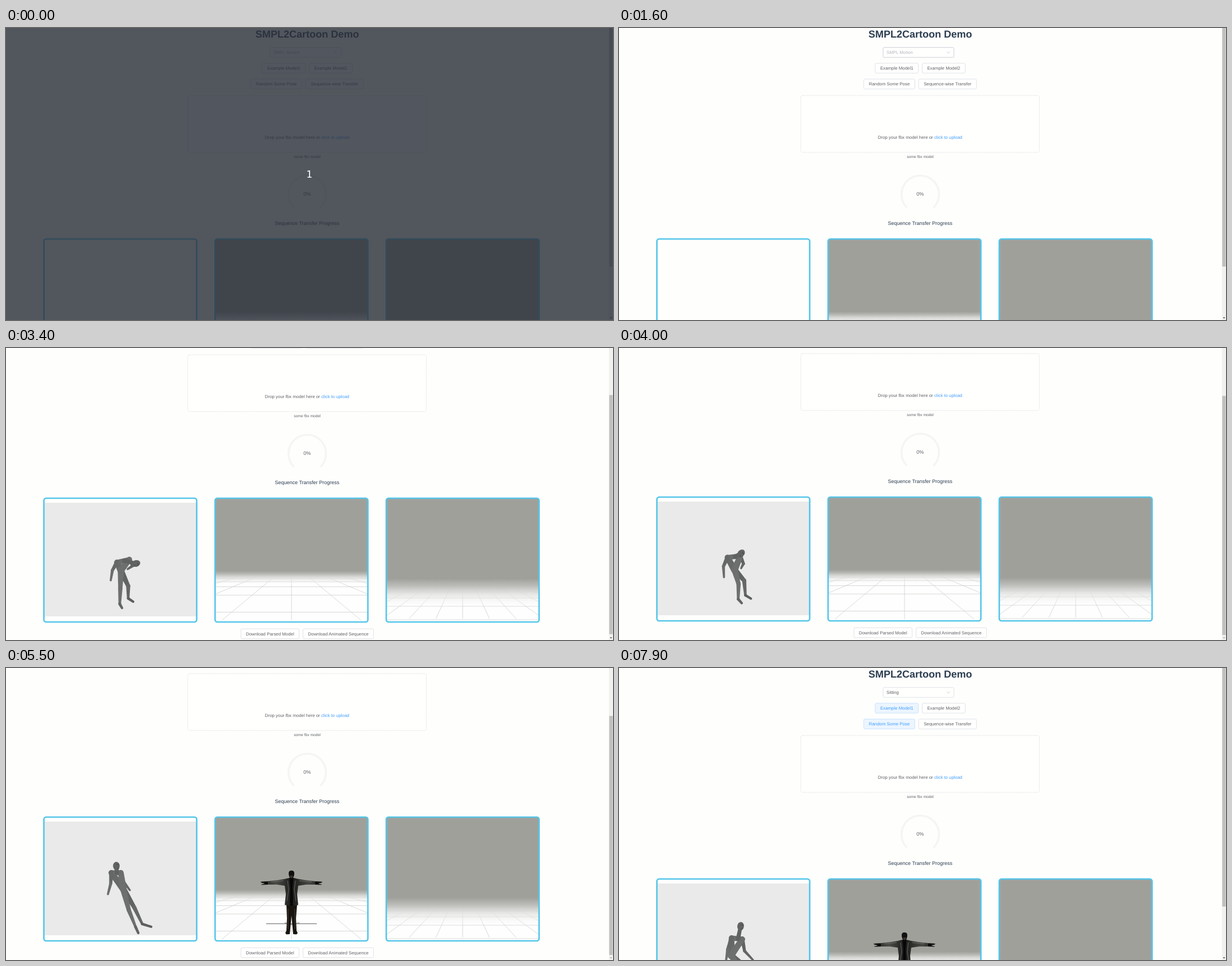
An HTML page for the animation above (8 s loop, 1078 by 519 pixels).

```html
<!DOCTYPE html>
<html lang="en">
<head>
<meta charset="utf-8">
<title>SMPL2Cartoon Demo</title>
<style>
  html, body { margin: 0; width: 100%; height: 100%; overflow: hidden; background: #fefefd; }
  svg { display: block; width: 1078px; height: 519px; }
  text { font: 7.875px "Liberation Sans", Arial, sans-serif; fill: #606266; text-rendering: geometricPrecision; }
  .mid { text-anchor: middle; }
  .title { font-size: 18px; font-weight: bold; fill: #2c3e50; }
  .big { font-size: 9px; }
  .small { font-size: 6.75px; }
  .link { fill: #409eff; }
  .box { fill: #fffffe; stroke: #d8dbe2; stroke-width: .8; }
  .on .box { fill: #ecf5ff; stroke: #bfdefd; }
  .on text { fill: #409eff; }
  .frame { fill: none; stroke: #54c6e9; stroke-width: 2.6; }
  .grid { fill: none; stroke: #c9c9c7; stroke-width: .7; }
  .count { font: 17.5px "DejaVu Sans", sans-serif; fill: #fff; }
</style>
</head>
<body>
<svg viewBox="0 0 1078 519">
  <defs>
    <linearGradient id="fogNear" x1="0" y1="504" x2="0" y2="529" gradientUnits="userSpaceOnUse">
      <stop offset="0" stop-color="#a0a09b"/>
      <stop offset=".2" stop-color="#b5b5b1"/>
      <stop offset=".42" stop-color="#d6d6d4"/>
      <stop offset="1" stop-color="#fefefe" stop-opacity="0"/>
    </linearGradient>
    <linearGradient id="fogFar" x1="0" y1="518" x2="0" y2="570" gradientUnits="userSpaceOnUse">
      <stop offset="0" stop-color="#a0a09b"/>
      <stop offset=".25" stop-color="#bcbcb9"/>
      <stop offset=".5" stop-color="#dededc" stop-opacity=".85"/>
      <stop offset="1" stop-color="#fefefe" stop-opacity="0"/>
    </linearGradient>
    <linearGradient id="coat" x1="0" y1="0" x2="1" y2="0">
      <stop offset="0" stop-color="#20201e"/>
      <stop offset=".25" stop-color="#4b4b47"/>
      <stop offset=".5" stop-color="#1b1b1a"/>
      <stop offset=".78" stop-color="#474743"/>
      <stop offset="1" stop-color="#1c1c1b"/>
    </linearGradient>
    <filter id="shade" x="-20%" y="-20%" width="140%" height="140%">
      <feDropShadow dx="0" dy="1.1" stdDeviation="3.3" flood-opacity=".12"/>
    </filter>
    <clipPath id="view"><rect x="68" y="383" width="270" height="202"/></clipPath>
    <clipPath id="c370"><rect x="371.5" y="375" width="271" height="220" rx="3"/></clipPath>
    <clipPath id="c674"><rect x="675.5" y="375" width="271" height="220" rx="3"/></clipPath>
  </defs>

  <g id="page">
    <text class="mid title" x="535" y="17.4">SMPL2Cartoon Demo</text>
    <rect id="select" class="box" x="469" y="34.6" width="125.8" height="17.6" rx="2"/>
    <text id="value" x="475" y="46.2"></text>
    <path id="chevron" d="M-2.6-1.3 0 1.3 2.6-1.3" fill="none" stroke="#b9bdc5" stroke-width=".8"/>
    <g id="buttons"></g>

    <rect id="zone" x="322.9" y="120" width="423.6" height="101" rx="3.4" fill="#fffffe" stroke="#dadada" stroke-width=".8" stroke-dasharray="1.8 1.2"/>
    <text class="mid" x="534.8" y="196.5">Drop your fbx model here or <tspan class="link">click to upload</tspan></text>
    <text class="mid small" x="535" y="231.4">some fbx model</text>
    <path d="M511.5 319.2A33.3 33.3 0 1 1 558.5 319.2" fill="none" stroke="#f5f5f4" stroke-width="3.6"/>
    <text class="mid big" x="534.8" y="298.3">0%</text>
    <text class="mid big" x="534.8" y="350" style="fill:#2c3e50">Sequence Transfer Progress</text>

    <g id="body" clip-path="url(#view)">
      <rect x="68" y="383" width="270" height="202" fill="#eaeaea"/>
    </g>
    <g id="floors"></g>
    <g id="model" transform="translate(507 470)">
      <path d="M-45 94.5H45M-12 93 0 96 14 93" stroke="#8d8d8a" stroke-width="1.4" fill="none"/>
      <path d="M-9 60-8 85-9 107-11 111-9 113.500-3 113 0 80 3 113 9 113.500 11 111 9 107 8 85 10 60Z" fill="#17140f"/>
      <path d="M-6 68-6 104M6 68 6 104" stroke="#332a1d" stroke-width="2" fill="none"/>
      <path d="M-4 13-12 15-24 17-42 19-55 20-53 22-46 23-55 25-44 25-26 25-12 27-10 42-12 61-4 63 0 50 4 63 12 61 10 42 12 27 26 25 44 25 55 25 46 23 53 22 55 20 42 19 24 17 12 15 4 13Z" fill="url(#coat)"/>
      <path d="M-55 20-42 19.500-42 25-54 25.500-47 23ZM55 20 42 19.500 42 25 54 25.500 47 23Z" fill="#0d0d0c"/>
      <path d="M-36 20-14 18M36 20 14 18M-7 18-5 34-8 54M7 18 5 34 8 54" stroke="#6a6a65" stroke-width="1.3" fill="none" opacity=".75"/>
      <path d="M-3.500 13-2 30-3 62H3L2 30 3.500 13Z" fill="#070707"/>
      <path d="M-5 5Q-5 0 0 0T5 5Q5 12 0 15.500Q-5 12-5 5Z" fill="#11100f"/>
      <path d="M-3 9H3L1.500 13H-1.500Z" fill="#3b342d"/>
    </g>
    <g id="frames"></g>
    <g id="menu" filter="url(#shade)">
      <path d="M485 59.300 488.500 55.800 492 59.300" fill="#fff"/>
      <rect x="469" y="59" width="132" height="275" rx="2.2" fill="#fff" stroke="#e4e7ed" stroke-width=".6"/>
      <rect id="hover" x="469.3" width="131.400" height="19.100" fill="#f5f7fa"/>
    </g>
  </g>

  <rect x="1070.7" width="7.300" height="519" fill="#f1f1f0"/>
  <rect id="thumb" x="1071.3" width="6.200" height="425" fill="#c0c0bf"/>
  <path id="arrow" d="M1072.300 514.200H1076.700L1074.500 516.600Z"/>
  <g id="cover">
    <rect width="1078" height="519" fill="#2a2f39" opacity=".81"/>
    <text class="mid count" x="538.8" y="266">1</text>
  </g>
</svg>
<script>
const LOOP = 8000, STEP = 100;
const $ = id => document.getElementById(id);

function add(parent, tag, attrs = {}, text = '') {
  const el = document.createElementNS('http://www.w3.org/2000/svg', tag);
  for (const k in attrs) el.setAttribute(k, attrs[k]);
  el.textContent = text;
  parent.append(el);
  return el;
}

function button(x, y, width, label) {
  const g = add($('buttons'), 'g');
  add(g, 'rect', { class: 'box', x, y, width, height: 17.5, rx: 2 });
  add(g, 'text', { class: 'mid', x: x + width / 2, y: y + 11.6 }, label);
  return g;
}
const model1 = button(454.9, 62.7, 76.7, 'Example Model1');
button(538.5, 62.7, 76.3, 'Example Model2');
const random = button(434.7, 90.8, 90.6, 'Random Some Pose');
button(532.2, 90.8, 102.6, 'Sequence-wise Transfer');
button(417.2, 607.2, 103.3, 'Download Parsed Model');
button(527.5, 607.2, 125.2, 'Download Animated Sequence');

// Perspective ground: rows at horizon + depth / (near + n), columns through the vanishing point.
function floor(x, horizon, fogTop, fog, slope, depth, near) {
  const g = add($('floors'), 'g', { 'clip-path': `url(#c${x})` });
  const cx = x + 137;
  let d = '';
  for (let n = 0; n < 14; n++) d += `M${x} ${horizon + depth / (near + n)}h274`;
  for (let n = -12; n <= 12; n++) d += `M${cx} ${horizon}L${cx + n * slope * 103} ${horizon + 103}`;
  add(g, 'rect', { x, y: 374, width: 274, height: 222, fill: '#fefefe' });
  add(g, 'path', { d, class: 'grid' });
  add(g, 'rect', { x, y: fogTop, width: 274, height: 596 - fogTop, fill: `url(#${fog})` });
  add(g, 'rect', { x, y: 374, width: 274, height: fogTop - 373.8, fill: '#a0a09b' });
}
floor(370, 489, 504, 'fogNear', 1.2, 170, 1.92);
floor(674, 486, 518, 'fogFar', .4615, 357, 3.4);
for (const x of [66, 370, 674])
  add($('frames'), 'rect', { class: 'frame', x: x + 1.3, y: 375, width: 271.4, height: 220, rx: 4 });

const options = ['Walking', 'Running', 'Sitting', 'Jumping', 'Dancing', 'Kicking', 'Waving',
  'Punching', 'Crawling', 'Stretching', 'Throwing', 'Climbing', 'Turning', 'Standing'];
const rowY = i => 62.4 + i * 19.125;
options.forEach((name, i) => add($('menu'), 'text', { x: 480, y: rowY(i) + 12.3 }, name));

// Joints: head, shoulders A B, pelvis, elbow+hand A, elbow+hand B, knee+ankle+toe A, knee+ankle+toe B.
const bend = [231,491, 197,489, 219,484, 204,503, 189,503, 186,521, 225,495, 216,501,
  203,536, 202,563, 206,570, 217,531, 217,553, 226,559];
const sit = [199,455, 187,474, 211,474, 207,506, 181,492, 187,513, 216,491, 218,502,
  224,521, 224,548, 233,555, 229,514, 234,545, 245,551];
const lean = [196,462, 187,474, 204,474, 208,502, 186,493, 181,512, 209,490, 220,505,
  218,540, 230,570, 235,581, 228,536, 242,565, 258,570];
const slide = [193,463, 186,474, 202,473, 208,503, 186,492, 180,512, 207,488, 219,504,
  210,541, 220,572, 227,584, 220,538, 232,569, 244,576];
const crouch = [216,459, 200,480, 219,482, 199,511, 193,500, 190,521, 223,503, 238,519,
  212,530, 202,560, 212,566, 222,528, 215,556, 226,562];
const poses = [[2400, crouch], [3400, bend], [4700, sit], [5500, lean], [6700, slide], [7900, crouch]];

// from, to, radii, shade
const limbs = [
  [2, 6, 3.6, 2.6, '#5f6261'], [6, 7, 2.6, 1.7, '#636665'],
  [3, 11, 5.4, 3.6, '#606362'], [11, 12, 3.7, 2.2, '#656867'], [12, 13, 2.4, 2, '#5c5f5e'],
  [3, 8, 5.6, 3.7, '#6d706f'], [8, 9, 3.8, 2.3, '#6d706f'], [9, 10, 2.6, 2.2, '#626564'],
  [1, 3, 5, 6.2, '#666968'], [2, 3, 5, 6, '#6c6f6e'], [1, 2, 4.4, 4.4, '#6a6d6c'],
  [1, 4, 3.8, 2.7, '#646766'], [4, 5, 2.7, 1.8, '#6a6d6c']
].map(([a, b, ra, rb, fill]) => ({ a, b, ra, rb, el: add($('body'), 'path', { fill }) }));
const neck = add($('body'), 'path', { fill: '#5f6261' });
const head = add($('body'), 'ellipse', { rx: 5.9, ry: 7.6, fill: '#606362' });
const face = add($('body'), 'path', { d: 'M0-2.500H4.500M1 4H4', stroke: '#484b4a', 'stroke-width': 1.1, fill: 'none' });

function capsule([x1, y1], [x2, y2], r1, r2) {
  const a = Math.atan2(y2 - y1, x2 - x1), nx = -Math.sin(a), ny = Math.cos(a);
  return `M${x1 + nx * r1} ${y1 + ny * r1}A${r1} ${r1} 0 0 1 ${x1 - nx * r1} ${y1 - ny * r1}` +
    `L${x2 - nx * r2} ${y2 - ny * r2}A${r2} ${r2} 0 0 1 ${x2 + nx * r2} ${y2 + ny * r2}Z`;
}

function span(keys, t) {
  let i = 0;
  while (i < keys.length - 2 && t >= keys[i + 1][0]) i++;
  const [t0, a] = keys[i], [t1, b] = keys[i + 1];
  return { a, b, k: Math.min(1, Math.max(0, (t - t0) / (t1 - t0))) };
}
function tween(keys, t) {
  const { a, b, k } = span(keys, t);
  return a + (b - a) * k;
}

function drawBody(t) {
  const { a, b, k } = span(poses, t);
  const ease = k * k * (3 - 2 * k);
  const v = a.map((n, i) => n + (b[i] - n) * ease);
  const joint = i => [v[i * 2], v[i * 2 + 1]];
  for (const l of limbs) l.el.setAttribute('d', capsule(joint(l.a), joint(l.b), l.ra, l.rb));
  const [hx, hy] = joint(0), [ax, ay] = joint(1), [bx, by] = joint(2);
  const nx = ax * .4 + bx * .6, ny = ay * .4 + by * .6;
  neck.setAttribute('d', capsule([hx, hy], [nx, ny], 3.2, 3.8));
  const tilt = Math.atan2(hx - nx, ny - hy) * 180 / Math.PI * .7;
  const place = `translate(${hx} ${hy}) rotate(${tilt})`;
  head.setAttribute('transform', place);
  face.setAttribute('transform', place);
}

const scrollKeys = [[2900, 0], [3200, 80], [3400, 108], [3500, 110], [4100, 110], [4500, 0],
  [5000, 0], [5300, 85], [5500, 110], [6600, 110], [6700, 84], [7100, 0]];
const menuKeys = [[1600, 0], [1900, 1], [2400, 1], [2700, 0]];
const within = (t, from, to) => t >= from && t < to;
const show = (el, on) => el.setAttribute('display', on ? 'inline' : 'none');

function draw(t) {
  const scroll = tween(scrollKeys, t), open = tween(menuKeys, t);
  $('page').setAttribute('transform', `translate(0 ${-scroll})`);
  $('thumb').setAttribute('y', scroll * .783 - 1);
  $('arrow').setAttribute('fill', scroll >= 110 ? '#a3a3a3' : '#505050');
  show($('cover'), t < 100);

  $('zone').style.stroke = within(t, 500, 600) ? '#409eff' : '';
  model1.setAttribute('class', within(t, 600, 700) || t >= 4800 ? 'on' : '');
  random.setAttribute('class', t >= 7400 ? 'on' : '');
  $('select').style.stroke = within(t, 1700, 5000) ? '#409eff' : within(t, 900, 1700) ? '#c0c4cc' : '';

  const chosen = t >= 2400;
  $('value').textContent = chosen ? 'Sitting' : 'SMPL Motion';
  $('value').style.fill = chosen ? '#606266' : '#b2b5bc';
  $('chevron').setAttribute('transform', `translate(585 43.4) rotate(${180 * open})`);
  show($('menu'), open > 0);
  $('menu').setAttribute('opacity', open);
  $('menu').setAttribute('transform', `translate(0 ${56 * (1 - open)}) scale(1 ${open || 1})`);
  $('hover').setAttribute('y', rowY(t < 2000 ? 0 : t < 2100 ? 1 : 2));

  show($('body'), t >= 2500);
  show($('model'), t >= 5300);
  drawBody(t);
}

const start = performance.now();
function tick() {
  const t = (performance.now() - start) % LOOP;
  draw(Math.floor(t / STEP) * STEP);
  requestAnimationFrame(tick);
}
tick();
</script>
</body>
</html>
```
